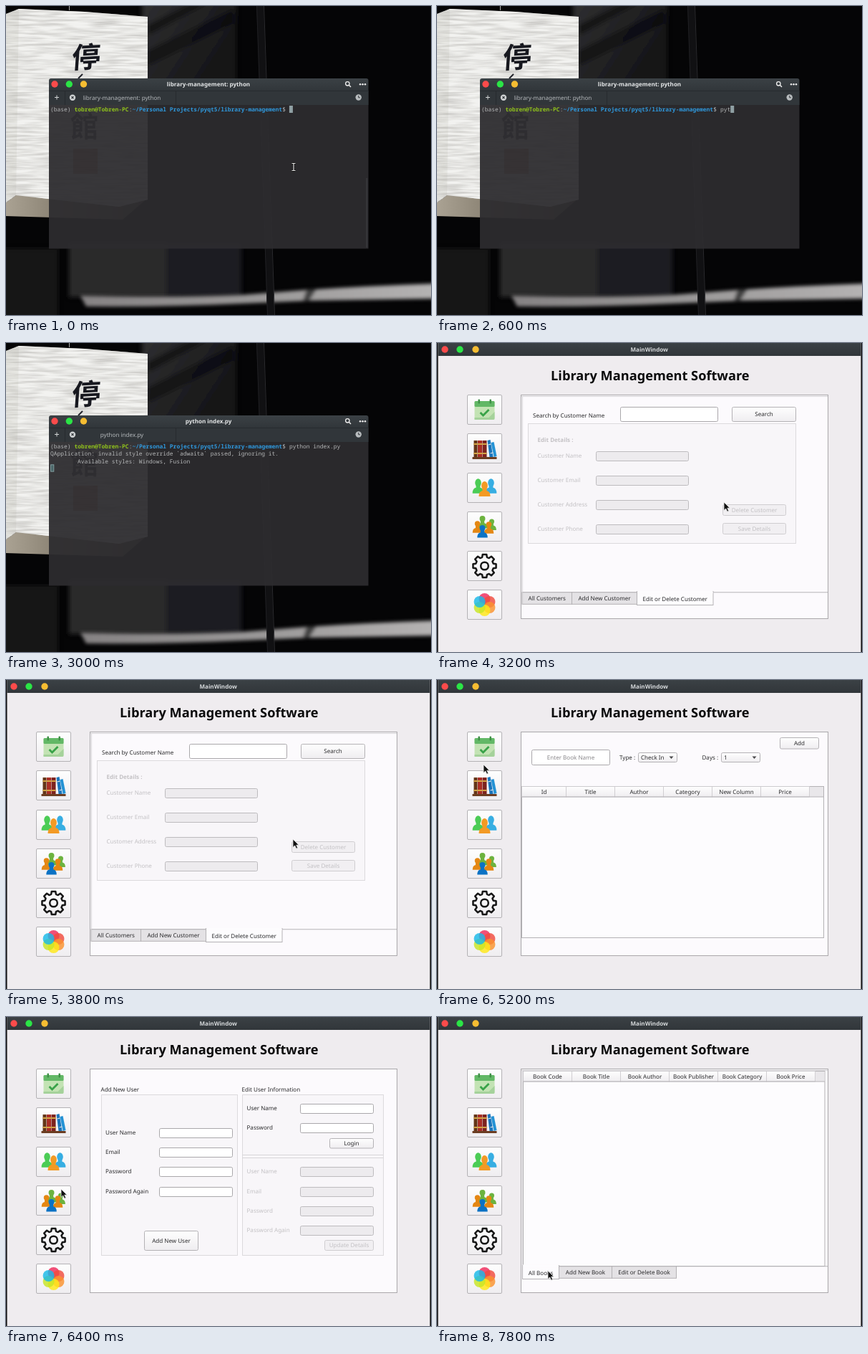
Write an HTML page that moves like this. It is 594 px wide and 431 px high and loops after 8 s.

```html
<!DOCTYPE html>
<html lang="en">
<head>
<meta charset="utf-8">
<title>Library management</title>
<style>
  html, body { margin: 0; width: 100%; height: 100%; overflow: hidden; background: #050505; }
  svg { display: block; width: 100vw; height: 100vh; }
  text { font: 8.05px "Noto Sans", sans-serif; white-space: pre; text-rendering: geometricPrecision; }
  .mono { font: 7.95px "Noto Sans Mono", monospace; }
  .heading { font-size: 18.2px; font-weight: 700; }
  .bold { font-weight: 700; }
  .brush { font: 700 40px "Noto Sans CJK SC", "Noto Sans CJK JP", sans-serif; }
</style>
</head>
<body>
<svg id="stage" viewBox="0 0 594 431" preserveAspectRatio="none"></svg>
<script>
const STEP = 200, LOOP = 8000, CHAR = 4.77;
const INK = '#2b2b2d', FAINT = '#c3c1c4', LINE = '#b4b2b5';

// Drawing helpers
const rect = (x, y, w, h, fill, more = '') =>
  `<rect x="${x}" y="${y}" width="${w}" height="${h}" fill="${fill}" ${more}/>`;
const circle = (x, y, r, fill, more = '') =>
  `<circle cx="${x}" cy="${y}" r="${r}" fill="${fill}" ${more}/>`;
const path = (d, fill, more = '') => `<path d="${d}" fill="${fill}" ${more}/>`;
const line = (d, color, width = 1) => path(d, 'none', `stroke="${color}" stroke-width="${width}"`);
const text = (x, y, s, fill = INK, cls = '', more = '') =>
  `<text x="${x}" y="${y}" fill="${fill}" class="${cls}" ${more}>${s}</text>`;
const centered = (x, y, s, fill = INK, cls = '', more = '') =>
  text(x, y, s, fill, cls, 'text-anchor="middle" ' + more);
const group = (id, content) => `<g id="${id}">${content}</g>`;
const lights = (xs, y) => xs.map((x, i) =>
  circle(x, y, 4.7, ['#fb4b4b', '#2be546', '#f6bd32'][i])).join('');

// Widgets
const frame = (x, y, w, h, fill = '#f8f6f9') => rect(x, y, w, h, fill, 'stroke="#dcdadd"');
const input = (x, y, w, h = 14, off = false) =>
  rect(x, y, w, h, off ? '#edebee' : '#fff', `rx="2" stroke="${off ? '#bdbbbe' : '#aaa8ab'}"`);
const button = (x, y, w, h, label, off = false) =>
  rect(x, y, w, h, off ? '#f1eff2' : 'url(#raised)', `rx="2" stroke="${off ? '#cfcdd0' : LINE}"`) +
  centered(x + w / 2, y + h / 2 + 2.8, label, off ? FAINT : INK);
const combo = (x, y, label) =>
  rect(x, y, 54, 13, 'url(#raised)', `rx="2" stroke="${LINE}"`) + text(x + 3.5, y + 9.3, label) +
  path(`M${x + 43} ${y + 5}h6l-3 3.4z`, '#4b4b4d');
const form = (x, y, gap, boxX, boxW, labels, off = false) => labels.map((label, i) =>
  text(x, y + gap * i, label, off ? FAINT : INK) +
  input(boxX, Math.round(y + gap * i - 9) + .5, boxW, 13, off)).join('');

function table(x, y, w, h, first, labels) {
  let s = rect(x, y, w, h, '#fdfcfe', `stroke="${LINE}"`) +
    rect(x + .5, y + .5, w - 1, 14, '#e9e7ea');
  let left = x;
  labels.forEach((label, i) => {
    const right = x + first + 68 * i;
    s += rect(left, y, right - left, 14.5, 'url(#raised)', 'stroke="#cbc9cc" stroke-width=".8"') +
      centered((left + right) / 2, y + 10.6, label);
    left = right;
  });
  return s + line(`M${x} ${y + 14.5}h${w}`, LINE);
}

function tabs(edges, labels, active) {
  let s = line('M119 347.8H546', LINE) + line('M119.5 74V348M118 74.5H546', '#d6d4d7');
  labels.forEach((label, i) => {
    const x = edges[i], w = edges[i + 1] - x, on = i === active;
    s += rect(x, on ? 346.5 : 347.8, w, on ? 19 : 16.5, on ? '#fdfcfe' : '#e4e2e5', `stroke="${LINE}"`) +
      (on ? rect(x + .5, 345.5, w - 1, 4, '#fdfcfe') : '') +
      centered(x + w / 2, on ? 359.6 : 359, label);
  });
  return s;
}

// Sidebar icons, drawn around the origin
const person = (x, y, k, color, round = 1) =>
  `<g transform="translate(${x} ${y}) scale(${k})" fill="${color}">
    <ellipse rx="4.4" ry="${4.4 * round}"/>
    <path d="M-8 15q0-7 5-8l0-4h6v4q5 1 5 8z"/></g>`;

const polar = (r, a) => `${(r * Math.cos(a)).toFixed(2)} ${(r * Math.sin(a)).toFixed(2)}`;
function gear() {
  const points = [];
  for (let i = 0; i < 8; i++)
    [[12.6, -.27], [16.3, -.17], [16.3, .17], [12.6, .27]].forEach(([r, a]) =>
      points.push(polar(r, a + i * Math.PI / 4)));
  const stroke = 'stroke="#161616" stroke-width="2.5" stroke-linejoin="round"';
  return path('M' + points.join('L') + 'z', 'none', stroke) + circle(0, 0, 5.3, 'none', stroke);
}

const icons = [
  rect(-14, -12, 28, 26, '#c3e3b4', 'rx="1.5"') + path('M-14 14v-3h20l8-8v9q0 2-2 2z', '#a5d29b') +
    rect(-14, -12, 28, 8, '#62b866', 'rx="1.5"') +
    [-9, 7].map(x => rect(x, -14.5, 2.5, 6, '#3f8f47', 'rx="1"')).join('') +
    line('M-6 4l4 4 8-8', '#3aa349', 2.8),
  rect(-17, 12, 34, 3, '#6b3d22') +
    [[-15, 5, '#633517'], [-9.5, 6, '#a92e25'], [-3, 6, '#7d241f']].map(([x, w, c]) =>
      rect(x, -11, w, 23, c) + rect(x, -7, w, 2, '#d5a443') + rect(x, 6, w, 2, '#d5a443')).join('') +
    path('M4-11l4-1 4 24h-5z', '#1b75bb') + path('M9-8l4-1 4 20-4 1z', '#2492d4') +
    line('M5-5l4-1M8 7l4-1', '#e8e8e8', 1.2),
  person(-9, -7, .98, '#4bcc55', 1.35) + person(9, -7, .98, '#37aee2', 1.35) +
    person(0, -3, 1, '#f39a24', 1.35),
  person(-3, -11, .9, '#6cb33f') + person(10, -7, .8, '#6cb33f') + person(-10, -4, .85, '#e48713') +
    person(6, -3, .85, '#e48713') + person(-3, 2, .9, '#0b72c4'),
  gear(),
  ['#ee2a5a', '#f04c3e', '#fa922e', '#ffe817', '#c8e526', '#18b9e8'].map((c, i) => {
    const a = -Math.PI / 2 + i * Math.PI / 3;
    return circle(8 * Math.cos(a), 8 * Math.sin(a), 8, c, 'opacity=".82"');
  }).join('')
];
const sidebar = icons.map((icon, i) => {
  const y = 72.5 + Math.round(54.4 * i);
  return rect(42.5, y, 48, 41, 'url(#raised)', `rx="1.5" stroke="${LINE}"`) +
    `<g transform="translate(66.5 ${y + 20.5})">${icon}</g>`;
}).join('');

const pages = {
  customers:
    text(134, 104, 'Search by Customer Name') + input(256.5, 89.5, 136, 20) +
    button(412.5, 89.5, 89, 20, 'Search') + frame(127.5, 112.5, 374, 167) +
    text(140.5, 138, 'Edit Details :', FAINT, 'bold') +
    form(140.5, 160, 34, 222.5, 129,
      ['Customer Name', 'Customer Email', 'Customer Address', 'Customer Phone'], true) +
    button(399.5, 225.5, 88, 15, 'Delete Customer', true) +
    button(399.5, 251.5, 88, 15, 'Save Details', true) +
    tabs([119, 188.5, 279.5, 386], ['All Customers', 'Add New Customer', 'Edit or Delete Customer'], 2),
  daily:
    button(479.5, 80.5, 54, 15.5, 'Add') + input(132.5, 97.5, 109, 21) +
    centered(187, 111, 'Enter Book Name', '#89878a') +
    text(255, 111, 'Type :') + combo(281.5, 101.5, 'Check In') +
    text(370.5, 111, 'Days :') + combo(397.5, 101.5, '1') +
    table(118.5, 148.5, 422, 211, 62, ['Id', 'Title', 'Author', 'Category', 'New Column', 'Price']),
  books:
    table(120.5, 75.5, 421.5, 272, 68,
      ['Book Code', 'Book Title', 'Book Author', 'Book Publisher', 'Book Category', 'Book Price']) +
    tabs([119.5, 170.5, 244.5, 334.5], ['All Books', 'Add New Book', 'Edit or Delete Book'], 0),
  users:
    text(132.5, 103.5, 'Add New User') + frame(133.5, 108.5, 190, 224) +
    form(139, 164, 27.2, 214.5, 102, ['User Name', 'Email', 'Password', 'Password Again']) +
    button(193.5, 298.5, 75, 27, 'Add New User') +
    text(329.5, 103.5, 'Edit User Information') + frame(330.5, 108.5, 197, 224) +
    form(336.5, 130, 27.2, 411.5, 102, ['User Name', 'Password']) +
    button(452.5, 169.5, 61, 13.5, 'Login') +
    line('M330 192.5H527M330 196.5H527', '#d8d6d9') +
    form(336.5, 218.3, 27.2, 411.5, 102, ['User Name', 'Email', 'Password', 'Password Again'], true) +
    button(445.5, 311.5, 68, 14, 'Update Details', true)
};

const app =
  rect(0, 0, 594, 431, '#0a0a0b') + rect(1.5, 0, 591, 431, '#efecef') +
  rect(1.5, 0, 591, 18, 'url(#bar)') + lights([11, 32, 54], 9) +
  centered(296.7, 12, 'MainWindow', '#d5d8da', 'bold') +
  centered(297.8, 52.3, 'Library Management Software', '#0b0b0c', 'heading') +
  sidebar + rect(117.5, 72.5, 429, 312, '#fcfafd', 'stroke="#aaa8ab"') +
  Object.entries(pages).map(([id, s]) => group(id, s)).join('');

const lantern = 'M0 11L18 4 110 8 198 15V270L158 280 14 264 0 274z';
const backdrop =
  rect(0, 0, 594, 431, '#050506') +
  `<g filter="url(#soft)">` +
    path('M190 -9H322V112H190z', 'url(#haze)') +
    path('M198 62L318 4V24L198 84zM198 26L262 -6H286L198 42z', '#0c0c0d', 'opacity=".7"') +
    rect(-9, 338, 82, 100, '#151516') +
    rect(88, 330, 136, 76, '#2a2a2c') + rect(224, 330, 105, 76, '#1f1f21') +
  '</g>' +
  `<g filter="url(#glow)">` +
    path('M104 404Q230 407 330 403L420 396Q510 390 604 387V408L424 411 330 415Q230 420 112 419z', 'url(#streak)') +
    path('M420 395l14 0-10 16h-9z', '#111', 'opacity=".65"') +
  '</g>' +
  path('M350 0H360L375 431H365z', '#111113') + line('M360.5 0L375.5 431', '#2b2b2e') +
  line('M350.5 0L365.5 431', '#202023') +
  line('M88.5 0V6', '#aaa') +
  path('M0 274L14 264 198 268 163 298 0 293z', 'url(#base)') +
  path(lantern, '#cfcecb') + path(lantern, '#fff', 'filter="url(#paper)"') +
  path('M0 11L18 4 14 264 0 274z', '#8c8678', 'opacity=".1"') +
  `<g transform="translate(91 87) skewX(-7) rotate(-3)">${text(0, 0, '停', '#17181f', 'brush')}</g>` +
  line('M107 95l-6 6', '#22232b', 2) +
  text(90, 183, '館', '#17181f', 'brush', 'opacity=".75"') + rect(94, 199, 34, 35, '#a54522', 'opacity=".5"');

const prompt =
  text(62, 147, '(base)', '#b4b6b7', 'mono') +
  text(62 + 7 * CHAR, 147, 'tobren@Tobren-PC', '#8fc21c', 'mono bold') +
  text(62 + 23 * CHAR, 147, ':', '#b4b6b7', 'mono') +
  text(62 + 24 * CHAR, 147, '~/Personal Projects/pyqt5/library-management', '#2f98dc', 'mono bold') +
  text(62 + 68 * CHAR, 147, '$', '#b4b6b7', 'mono');

const beam = 'M399.5 219.5h5M399.5 229.5h5M402 219.5v10';
const terminal =
  rect(60, 118, 446.5, 220.5, '#2d2c2f', 'opacity=".94"') +
  path('M60 118V104q0-3 3-3h440.5q3 0 3 3v14z', 'url(#bar)') +
  rect(60, 118, 446.5, 20, '#31363a') + line('M60 118.5H506.5M82.5 119V138M237.5 119V138', '#272b2f') +
  lights([68, 88.3, 108.5], 109) +
  circle(477.3, 108.3, 2.7, 'none', 'stroke="#eee" stroke-width="1.3"') + line('M479.3 110.3l2.7 2.7', '#eee', 1.5) +
  [495, 498.5, 502].map(x => circle(x, 109.3, 1.25, '#eee')).join('') +
  line('M68 127.5h6M71 124.5v6', '#d2d4d5') +
  circle(93, 127.7, 4.2, '#ced1d2') + line('M91.5 126.2l3 3M94.5 126.2l-3 3', '#31363a', 1.2) +
  circle(492.7, 127.5, 4.2, '#b8bcbe') + line('M492.7 125v2.8h2.3', '#31363a') +
  centered(283, 111.7, '', '#e3e5e6', 'bold', 'id="title"') +
  centered(162, 130.6, '', '#b6babd', '', 'id="tabTitle"') +
  prompt + text(62 + 70 * CHAR, 147, '', '#b4b6b7', 'mono', 'id="typed"') +
  group('output',
    text(62, 157.3, 'QApplication: invalid style override `adwaita` passed, ignoring it.', '#b4b6b7', 'mono') +
    text(62, 167.5, '        Available styles: Windows, Fusion', '#b4b6b7', 'mono') +
    rect(62.6, 169.8, 4.2, 9.4, '#4b6668', 'stroke="#86a3a5" stroke-width=".9"')) +
  rect(0, 139, 5, 10, '#8f9fa3', 'id="caret"') +
  group('idle', rect(503, 240, 2.5, 97, '#353538') + line(beam, '#111', 2.8) + line(beam, '#e4e4e4', 1.2));

const gradient = (id, direction, ...colors) => `<linearGradient id="${id}" ${direction}>` +
  colors.map((c, i) => `<stop offset="${i / (colors.length - 1)}" stop-color="${c}"/>`).join('') +
  '</linearGradient>';
const down = 'x2="0" y2="1"';

document.getElementById('stage').innerHTML = '<defs>' +
  gradient('raised', down, '#fefefe', '#efedf0') +
  gradient('bar', down, '#3b4145', '#31363a') +
  gradient('haze', 'x2="1" y2=".6"', '#303032', '#141415') +
  gradient('base', '', '#aaa293', '#7d7566', '#4d463a') +
  gradient('streak', '', '#858283', '#9a9898', '#b5b3b3') +
  `<filter id="soft"><feGaussianBlur stdDeviation="3"/></filter>
  <filter id="glow" y="-.5" height="2"><feGaussianBlur stdDeviation="2.6"/></filter>
  <filter id="paper" x="0" y="0" width="1" height="1" color-interpolation-filters="sRGB">
    <feTurbulence type="fractalNoise" baseFrequency=".025 .32" numOctaves="2" seed="4"/>
    <feColorMatrix values="0 0 0 0 .95  0 0 0 0 .95  0 0 0 0 .94  2.2 0 0 0 -.45"/>
    <feComposite in2="SourceGraphic" operator="in"/>
  </filter></defs>` +
  backdrop + terminal + group('app', app) +
  group('pointer', path('M0 0V11.5L2.7 9 4.7 13.2 6.7 12.2 4.8 8.2H8.3z', '#111', 'stroke="#eee" stroke-width=".8"'));

const el = id => document.getElementById(id);
const show = (id, on) => el(id).setAttribute('display', on ? 'inline' : 'none');

const OPEN = 3200;
const pageStarts = [[OPEN, 'customers'], [5000, 'daily'], [5400, 'books'],
  [5800, 'customers'], [6200, 'users'], [7200, 'books']];
const route = [[OPEN, 401, 222], [4000, 401, 222], [4800, 66, 94], [5000, 65, 98], [5200, 65, 118],
  [5400, 66, 145], [5800, 67, 200], [6200, 75, 236], [6400, 77, 240], [6800, 70, 300],
  [7200, 64, 148], [7400, 64, 148], [7800, 155, 354]];

function pointerAt(t) {
  const next = route.findIndex(p => p[0] > t);
  if (next < 1) return route[next < 0 ? route.length - 1 : 0].slice(1);
  const [t0, x0, y0] = route[next - 1], [t1, x1, y1] = route[next];
  const u = (t - t0) / (t1 - t0), k = u * u * (3 - 2 * u);
  return [x0 + (x1 - x0) * k, y0 + (y1 - y0) * k];
}

function draw(time) {
  const t = Math.floor(time % LOOP / STEP) * STEP;
  const count = t <= 1400 ? Math.min(6, t / STEP) : Math.min(15, 6 + Math.round((t - 1400) / STEP * 1.8));
  const running = t >= 2600;
  const title = running ? 'python index.py' : 'library-management: python';
  el('typed').textContent = 'python index.py'.slice(0, count);
  el('title').textContent = el('tabTitle').textContent = title;
  el('caret').setAttribute('x', 62 + (70 + count) * CHAR);
  show('caret', !running);
  show('output', t >= 2800);
  show('idle', t < STEP);

  const open = t >= OPEN;
  show('app', open);
  show('pointer', open);
  if (open) {
    const current = pageStarts.filter(([start]) => start <= t).pop()[1];
    Object.keys(pages).forEach(id => show(id, id === current));
    el('pointer').setAttribute('transform', `translate(${pointerAt(t)})`);
  }
}

const begin = performance.now();
(function tick() {
  draw(performance.now() - begin);
  requestAnimationFrame(tick);
})();
</script>
</body>
</html>
```
